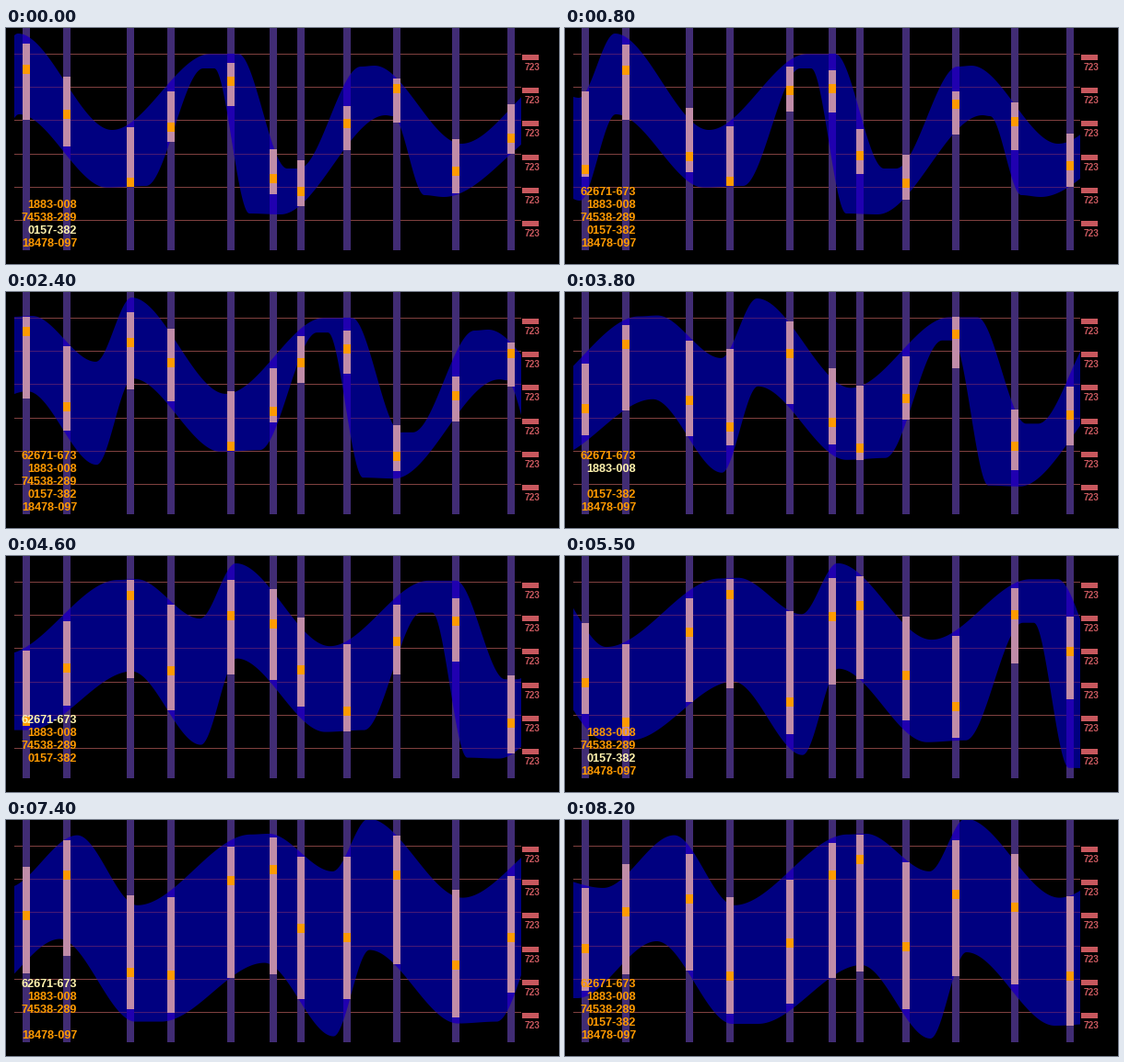
Animation, 600 px wide and 257 px high, one loop 8300 ms. Source, as a matplotlib script:

```python
import numpy as np
import matplotlib.pyplot as plt
from matplotlib.animation import FuncAnimation
from matplotlib.patches import Polygon, Rectangle

W, H, DPI = 600, 257, 100
FRAMES, STEP = 83, 100
SPEED = 5.14  # wave travel in pixels per frame

BLUE, BRIGHT = "#000080", "#2000b0"
PURPLE, PINK, ORANGE = "#412c74", "#c08ca8", "#ff9a00"
RED, PALE = "#c8585e", "#fff3ae"
LINE, LINE_IN = "#80403f", "#481a74"

# Crests and troughs in coordinates that travel with the wave;
# two neighbours of like height make a broad one.
UPPER = [(-450, 80), (-380, 98), (-303, 28), (-238, 121), (-115, 27),
         (-95, 26), (-26, 76), (13, 6), (115, 111), (222, 28), (252, 28),
         (305, 153), (318, 153), (385, 42), (400, 41), (494, 126), (600, 50)]
LOWER = [(-408, 144), (-322, 82), (-240, 172), (-212, 172), (-100, 108),
         (-25, 188), (14, 94), (110, 174), (152, 172), (214, 44), (226, 44),
         (264, 202), (298, 203), (412, 95), (420, 96), (454, 182),
         (475, 184), (610, 100)]
# Gauge readings at each crest: place, top, marker, end.
GAUGE = [(-399, 98, 140, 136), (-312, 35, 60, 100), (-225, 119, 183, 168),
         (-105, 27, 42, 115), (-28, 74, 165, 168), (20, 17, 45, 100),
         (128, 109, 170, 174), (230, 28, 46, 74), (308, 148, 182, 198),
         (412, 50, 60, 97), (488, 121, 156, 180), (570, 75, 112, 128)]

BAR_X = np.array([18, 62, 131, 175, 240, 286, 316, 366, 420, 484, 544])
CODES = ["62671-673", "1883-008", "74538-289", "0157-382", "18478-097"]
BLINKS = [(0, 3), (1, 4), (3, 0), (4, 2), (2, 1), (4, 0)]  # (hidden, lit)


def ease(s):
    return s * s * (3 - 2 * s)


def ramp(n, start, stop):
    return ease(np.clip((n - start) / (stop - start), 0, 1))


def eased_curves(points, u):
    """Ease from crest to crest; one curve per column after the first."""
    place, *columns = np.array(points, float).T
    order = np.arange(len(place))
    pos = np.interp(u, place, order)
    base = np.floor(pos)
    pos = base + ease(pos - base)
    return [np.interp(pos, order, col) for col in columns]


def lift(y, n):
    """Upper side: troughs fill up first, then everything rises."""
    late = ramp(n, 50, 75)
    return y - (0.3 * ramp(n, 22, 72) - 0.12 * late) * (y - 20) - 10 * late


def sink(y, n):
    return y + 50 * ramp(n, 22, 82)


def wave(n):
    u = xs - SPEED * n
    up, = eased_curves(UPPER, u)
    low, = eased_curves(LOWER, u)
    return lift(up, n), sink(low, n)


def gauges(n):
    top, dot, end = eased_curves(GAUGE, BAR_X + 4 - SPEED * n)
    return lift(top, n), dot, sink(end, n)


fig = plt.figure(figsize=(W / DPI, H / DPI), dpi=DPI, facecolor="black")
ax = fig.add_axes([0, 0, 1, 1])
ax.set_xlim(0, W)
ax.set_ylim(H, 0)
ax.axis("off")


def box(x, y, w, h, color, z, clip=None):
    patch = ax.add_patch(Rectangle((x, y), w, h, fc=color, lw=0, zorder=z))
    if clip is not None:
        patch.set_clip_path(clip)
    return patch


def label(x, y, text, px, color):
    return ax.text(x, y, text, family="Liberation Sans", weight="bold",
                   size=px * 72 / DPI, color=color, ha="right",
                   va="center_baseline", zorder=8)


xs = np.linspace(9, 559, 551)
band = ax.add_patch(Polygon([(9, 0), (559, 0), (559, 9)], fc=BLUE, lw=0,
                            zorder=1))

for i in range(6):
    y = 28 + round(36.2 * i)
    box(9, y, 550, 1, LINE, 2)
    box(9, y, 550, 1, LINE_IN, 3, band)
    box(560, y + 1, 18, 6, RED, 4)
    label(579, y + 14, "723", 10, RED)

for x in BAR_X:
    box(x, 0, 8, 242, PURPLE, 4)
    box(x, 0, 8, 242, BRIGHT, 5, band)
rods = [box(x, 0, 8, 1, PINK, 6) for x in BAR_X]
marks = [box(x, 0, 8, 10, ORANGE, 7) for x in BAR_X]
codes = [label(77, 177.5 + 14 * i, c, 12.6, ORANGE)
         for i, c in enumerate(CODES)]


def draw(n):
    up, low = wave(n)
    band.set_xy(np.column_stack([np.r_[xs, xs[::-1]], np.r_[up, low[::-1]]]))

    for rod, mark, top, dot, end in zip(rods, marks, *gauges(n)):
        rod.set_y(top)
        rod.set_height(end - top)
        mark.set_y(dot - 5)

    beat, phase = divmod(n, 9)
    active = phase < 4 and beat < 9
    hidden, lit = BLINKS[beat % len(BLINKS)] if active else (None, None)
    for i, code in enumerate(codes):
        code.set_visible(i != hidden)
        code.set_color(PALE if i == lit else ORANGE)
    return [band, *rods, *marks, *codes]


anim = FuncAnimation(fig, draw, frames=FRAMES, interval=STEP,
                     init_func=lambda: draw(0), repeat=True, repeat_delay=0)
plt.show()
```
